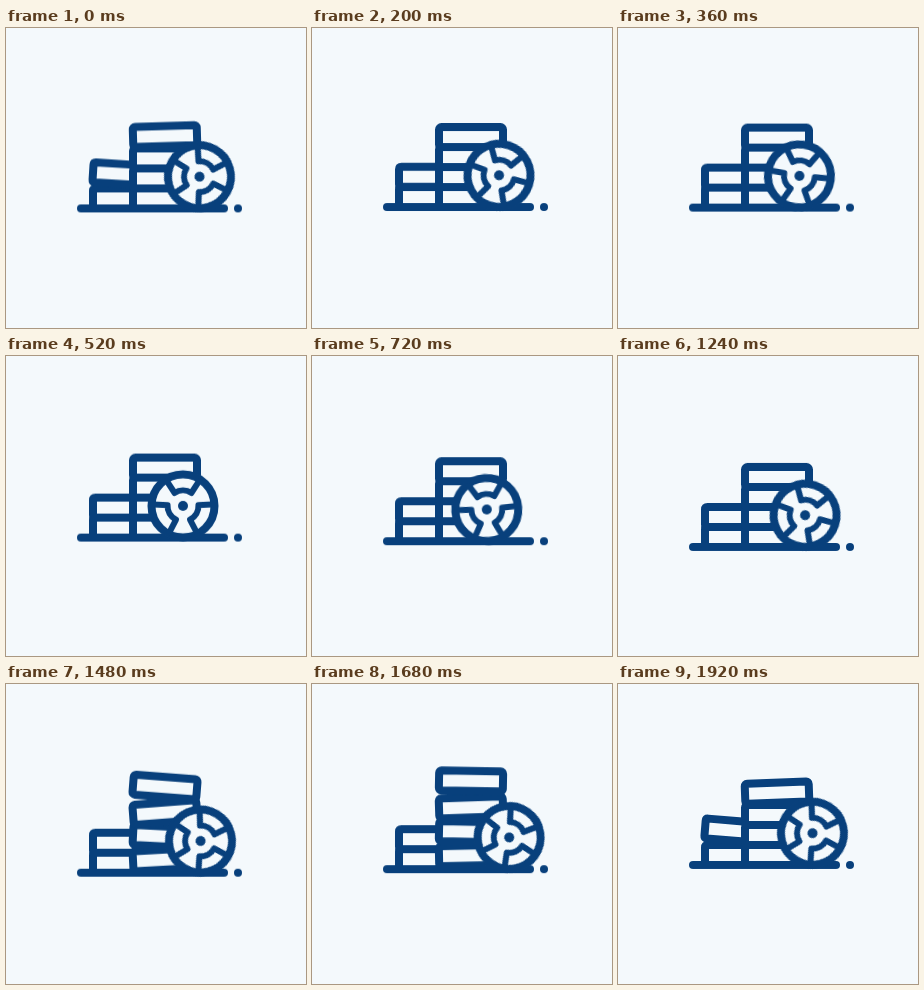
Animation, 300 px wide and 300 px high, one loop 1.96 s. Source, as an HTML page:

```html
<!DOCTYPE html>
<html lang="en">
<head>
<meta charset="utf-8">
<title>Casino chips</title>
<style>
  :root { --ink: #08407c; --paper: #f4f9fc; --sine: cubic-bezier(.364, 0, .636, 1); }
  html, body { margin: 0; width: 100%; height: 100%; overflow: hidden; background: var(--paper); }
  svg { display: block; width: 100%; height: 100%; }
  path, line, .rim, .chip { fill: none; stroke: var(--ink); stroke-width: 8; stroke-linecap: round; stroke-linejoin: round; }
  .chip, .rim { fill: var(--paper); }
  .dot { fill: var(--ink); }
  .wheel path { stroke-width: 6; }

  .scene { animation: float 980ms var(--sine) -1740ms infinite alternate; }
  .roll { animation: roll 980ms var(--sine) -1240ms infinite alternate; }
  .wheel { animation: spin 980ms var(--sine) -1240ms infinite alternate; }

  /* --h: hop height, --r: tilt, --b: share of the landing bounce */
  .chip {
    --h: 0; --r: 0; --b: 0;
    transform-box: fill-box;
    transform-origin: center;
    animation: hop 1960ms var(--delay) infinite, tilt 1960ms var(--delay) infinite;
  }
  .tall { --delay: -600ms; }
  .low { --delay: -280ms; }

  @keyframes float { from { transform: translateY(179px); } to { transform: translateY(191px); } }
  @keyframes roll { from { transform: translateX(174.8px); } to { transform: translateX(197.2px); } }
  @keyframes spin { from { transform: rotate(-4deg); } to { transform: rotate(36deg); } }
  @keyframes hop {
    0%, 25%, 35.2%, 100% { translate: 0 0; }
    0%, 25% { animation-timing-function: cubic-bezier(.333, .667, .667, 1); }
    12.7% { translate: 0 calc(var(--h) * -1px); animation-timing-function: cubic-bezier(.333, 0, .667, .333); }
    30% { translate: 0 calc(var(--b) * -2.5px); animation-timing-function: cubic-bezier(.333, 0, .667, .333); }
  }
  @keyframes tilt {
    0%, 35.2%, 100% { rotate: 0deg; animation-timing-function: ease-in-out; }
    6% { rotate: calc(var(--r) * 1deg); animation-timing-function: ease-in-out; }
    25% { rotate: calc(var(--r) * var(--b) * -.3deg); }
    30% { rotate: calc(var(--r) * var(--b) * -.45deg); }
  }
</style>
</head>
<body>
<svg viewBox="0 0 300 300">
  <g class="scene">
    <g class="low">
      <path class="chip" d="M127 -20H89.500Q87 -20 87 -17.500V-2.500Q87 0 89.500 0H127"/>
      <path class="chip" style="--h:5;--r:6" d="M127 -40H89.500Q87 -40 87 -37.500V-22.500Q87 -20 89.500 -20H127"/>
    </g>
    <g class="tall">
      <rect class="chip" style="--h:4;--r:-3" x="127" y="-20" width="64" height="20" rx="2.500"/>
      <rect class="chip" style="--h:8;--r:3" x="127" y="-40" width="64" height="20" rx="2.500"/>
      <rect class="chip" style="--h:13;--r:-4.500" x="127" y="-60" width="64" height="20" rx="2.500"/>
      <rect class="chip" style="--h:20;--r:4.500;--b:1" x="127" y="-80" width="64" height="20" rx="2.500"/>
    </g>
    <line x1="75" x2="218" y1="0" y2="0"/>
    <circle class="dot" cx="232" r="4"/>
    <g class="roll">
      <g transform="translate(0 -31.700)">
        <g class="wheel">
          <circle class="rim" r="31.500"/>
          <path id="notch" d="M-16.300 -25.200L-8.400 -13A15.500 15.500 0 0 1 8.400 -13L16.300 -25.200"/>
          <use href="#notch" transform="rotate(120)"/>
          <use href="#notch" transform="rotate(240)"/>
          <circle class="dot" r="5"/>
        </g>
      </g>
    </g>
  </g>
</svg>
</body>
</html>
```
